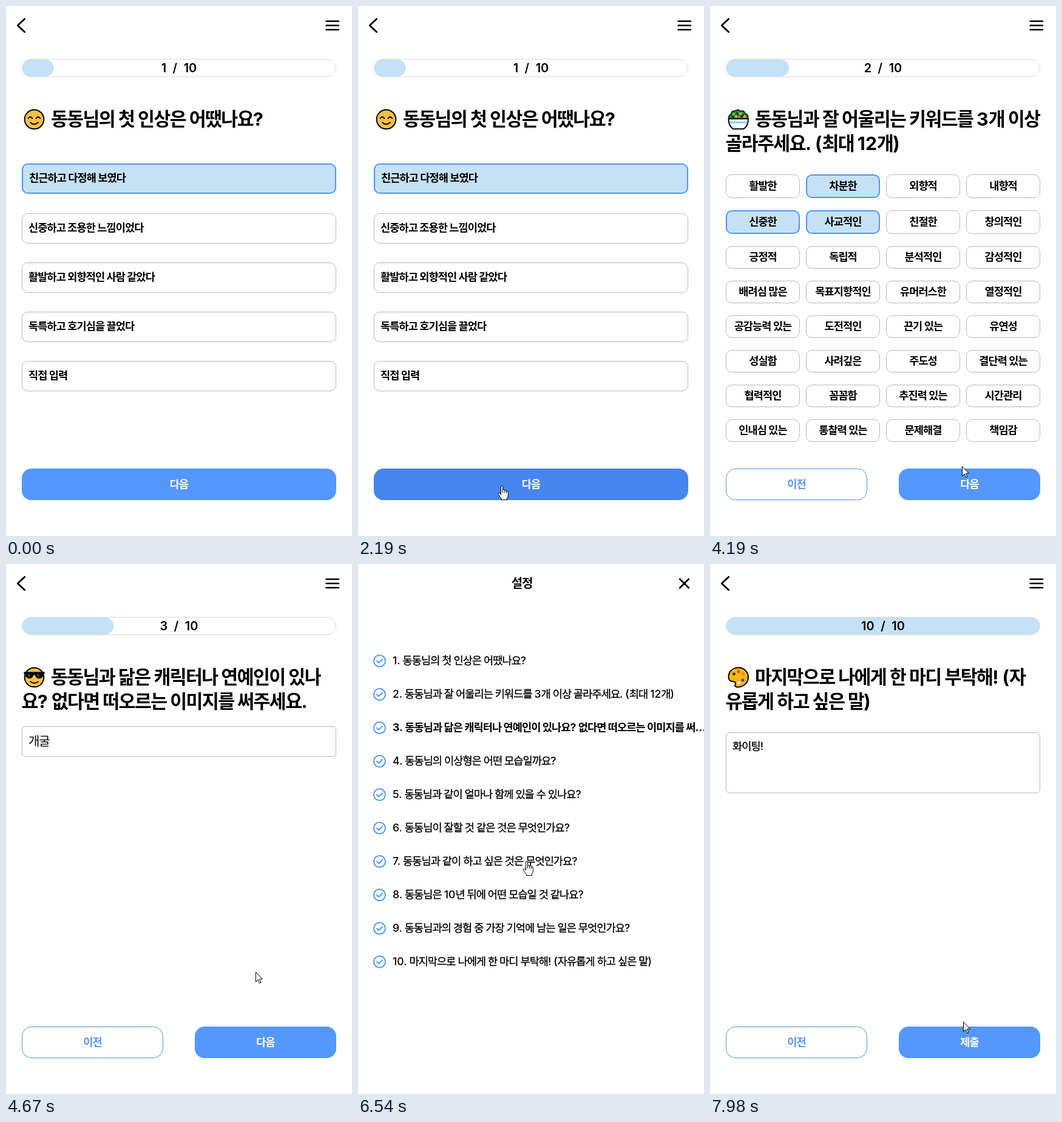
An HTML page for the animation above (8000 ms loop, 570 px wide and 872 px high).

```html
<!DOCTYPE html>
<html lang="ko">
<head>
<meta charset="utf-8">
<title>설문</title>
<style>
  html, body { margin: 0; width: 100%; height: 100%; overflow: hidden; background: #fff; }
  svg { display: block; width: 570px; height: 872px; }
  text { font-family: Inter, 'Noto Sans CJK KR', 'Noto Sans CJK', sans-serif; letter-spacing: -.055em; word-spacing: .01em; }
  text[font-weight="500"] { stroke: #000; stroke-width: .3px; }
  tspan { letter-spacing: 0; stroke: none; }
  .line { fill: none; stroke: #000; stroke-linecap: round; stroke-linejoin: round; }
</style>
</head>
<body>
<svg id="stage" viewBox="0 0 570 872"></svg>
<script>
const LOOP = 8000;
const BLUE = '#5498ff', HOVER = '#4586ee', EDGE = '#4c96f5', PALE = '#c5e1f6', GREY = '#b9b9b9';
const NAME = '동동님';

// Latin runs keep their natural spacing; Hangul is set slightly tighter.
const text = (str, x, middle, { size = 17.6, weight = 700, fill = '#000', anchor = 'start' } = {}) =>
  `<text x="${x}" y="${middle + size * .36}" font-size="${size}" font-weight="${weight}" fill="${fill}"
    text-anchor="${anchor}">${str.replace(/[\x21-\x7e\u00a0]+/g, '<tspan>$&</tspan>')}</text>`;

const box = (x, y, w, h, r, fill, stroke, sw = 1, cls = '') =>
  `<rect class="${cls}" x="${x + sw / 2}" y="${y + sw / 2}" width="${w - sw}" height="${h - sw}" rx="${r - sw / 2}"
    fill="${fill}" stroke="${stroke}" stroke-width="${sw}"/>`;

const choice = (x, y, w, h, on) =>
  on ? box(x, y, w, h, 10, PALE, EDGE, 2) : box(x, y, w, h, 10, '#fff', GREY);

const line = (d, width) => `<path class="line" d="${d}" stroke-width="${width}"/>`;
const dot = (x, y, r, fill) => `<circle cx="${x}" cy="${y}" r="${r}" fill="${fill}"/>`;

const title = (first, second = '') =>
  text(first, 74, 186.5, { size: 30.4 }) + text(second, 25.5, 226.5, { size: 30.4 });

const nextButton = (x, label) =>
  box(x, 761, 544 - x, 52, 16, BLUE, 'none', 0, 'next') +
  text(label, (x + 544) / 2, 787, { fill: '#fff', anchor: 'middle' });

const buttons = label =>
  box(26, 761, 233, 52, 16, '#fff', EDGE) +
  text('이전', 142.5, 787, { fill: '#5a97ee', anchor: 'middle' }) + nextButton(311, label);

const face = `<circle cx="46.5" cy="186.5" r="15.8" fill="#ffc043" stroke="#000" stroke-width="2"/>`;
const icons = {
  smile: face + line('M36.5 185q3.5-5 7 0M49.5 185q3.5-5 7 0M40 191.5q6.5 6 13 0', 1.8),
  cool: face + line('M40 193.5q7 5 13 0', 1.8) +
    `<path d="M29.5 177.5h34v3l-2 1q-1 7-7 7q-5 0-7-6h-2q-2 6-7 6q-6 0-7-7l-2-1z"/>
     <path d="M36 181l4 4M51 181l4 4" stroke="#777" stroke-width="1.4"/>`,
  salad: `<path d="M31 186q-1-6 4-8q0-6 6-5q5-4 9 0q6-2 8 4q6 2 4 9z" fill="#2c8a2f" stroke="#063b0d" stroke-width="2"/>` +
    line('M36 181l4 3M44 175l2 4M55 179l-4 4', 1.3) +
    dot(39, 178, 2, '#6fc04f') + dot(43, 182, 2.2, '#f2a15f') + dot(50, 177, 2.3, '#f2a15f') +
    dot(57, 182, 2.2, '#f2a15f') + dot(48, 183, 1.8, '#e77b43') +
    `<path d="M30.5 185.5h32.5q0 12-7.5 16.7h-17.5q-7.5-4.7-7.5-16.7z" fill="#fff" stroke="#000" stroke-width="2"/>
     <path d="M32 191.5h29.5" stroke="#8fd0f5" stroke-width="3"/>`,
  palette: `<path d="M47 170.5c-10 0-16.5 7-16.5 15c0 6 4 8 8 8c4 0 4 3 3 5c-1 3 2 4.5 6 4c9-1 15.5-8 15.5-16c0-9-7-16-16-16z"
      fill="#ffb60d" stroke="#000" stroke-width="2"/>` +
    dot(39.5, 181, 2.4, '#4a2a12') + dot(47, 177, 2.4, '#c9540c') + dot(55, 181, 2.4, '#e58a00') +
    dot(54, 191, 2.6, '#2455b8') + dot(47.5, 196, 2.4, '#fff'),
};

const options = ['친근하고 다정해 보였다', '신중하고 조용한 느낌이었다', '활발하고 외향적인 사람 같았다',
  '독특하고 호기심을 끌었다', '직접 입력'];
const optionY = i => Math.round(259.3 + 81.2 * i);

const chips = ['활발한', '차분한', '외향적', '내향적', '신중한', '사교적인', '친절한', '창의적인',
  '긍정적', '독립적', '분석적인', '감성적인', '배려심 많은', '목표지향적인', '유머러스한', '열정적인',
  '공감능력 있는', '도전적인', '끈기 있는', '유연성', '성실함', '사려깊은', '주도성', '결단력 있는',
  '협력적인', '꼼꼼함', '추진력 있는', '시간관리', '인내심 있는', '통찰력 있는', '문제해결', '책임감'];
const pickedChips = [1, 4, 5];
const chipBox = i => {
  const row = i >> 2;
  return [26 + 132 * (i % 4), row < 2 ? 277 + 59 * row : 281 + 57 * row, 122, row < 2 ? 39 : 37];
};

const questions = [`${NAME}의 첫 인상은 어땠나요?`, `${NAME}과 잘 어울리는 키워드를 3개 이상 골라주세요. (최대 12개)`,
  `${NAME}과 닮은 캐릭터나 연예인이 있나요? 없다면 떠오르는 이미지를 써...`, `${NAME}의 이상형은 어떤 모습일까요?`,
  `${NAME}과 같이 얼마나 함께 있을 수 있나요?`, `${NAME}이 잘할 것 같은 것은 무엇인가요?`,
  `${NAME}과 같이 하고 싶은 것은 무엇인가요?`, `${NAME}은 10년 뒤에 어떤 모습일 것 같나요?`,
  `${NAME}과의 경험 중 가장 기억에 남는 일은 무엇인가요?`, '마지막으로 나에게 한 마디 부탁해! (자유롭게 하고 싶은 말)'];

const pages = {
  first: icons.smile + title(`${NAME}의 첫 인상은 어땠나요?`) +
    options.map((label, i) => choice(26, optionY(i), 518, 50, i === 0) +
      text(label, i ? 37 : 38, optionY(i) + 24)).join('') + nextButton(26, '다음'),
  keywords: icons.salad + title(`${NAME}과 잘 어울리는 키워드를 3개 이상`, '골라주세요. (최대 12개)') +
    chips.map((label, i) => {
      const [x, y, w, h] = chipBox(i);
      return choice(x, y, w, h, pickedChips.includes(i)) + text(label, x + w / 2, y + h / 2 - .5, { anchor: 'middle' });
    }).join('') + buttons('다음'),
  lookalike: icons.cool + title(`${NAME}과 닮은 캐릭터나 연예인이 있나`, '요? 없다면 떠오르는 이미지를 써주세요.') +
    box(26, 267, 518, 50, 6, '#fff', GREY) + text('개굴', 37, 292, { size: 20, weight: 400 }) + buttons('다음'),
  menu: text('설정', 270, 32, { size: 20, anchor: 'middle' }) + line('M530.2 24.7l14.6 14.6m0-14.6l-14.6 14.6', 2.8) +
    questions.map((q, i) => {
      const y = 159 + 55 * i;
      return `<g fill="none" stroke="#519cf8" stroke-width="2"><circle cx="35.5" cy="${y + .5}" r="9.5"/>
        <path d="M31 ${y + .5}l3.2 3.2l6-6" stroke-linecap="round" stroke-linejoin="round"/></g>` +
        text(`${i + 1}. ${q}`, 57, y, { weight: i === 2 ? 700 : 500 });
    }).join(''),
  last: icons.palette + title('마지막으로 나에게 한 마디 부탁해! (자', '유롭게 하고 싶은 말)') +
    box(26, 277, 518, 100, 6, '#fff', GREY) + text('화이팅!', 37, 300, { weight: 500 }) + buttons('제출'),
};

const scenes = [
  { at: 0, page: 'first', step: 1, from: 1 },
  { at: 2390, page: 'keywords', step: 2, from: 1 },
  { at: 4400, page: 'lookalike', step: 3, from: 2 },
  { at: 5840, page: 'menu' },
  { at: 7220, page: 'last', step: 10, from: 3 },
];

// Pointer path: time, x, y
const path = [
  [530, 228, 798], [900, 236, 772], [1160, 238, 735], [1300, 240, 662], [1440, 243, 569], [1580, 247, 508],
  [1700, 247, 515], [1900, 243, 680], [2120, 240, 788], [2190, 237, 789], [2390, 237, 789],
  [2680, 267, 411], [2820, 267, 411], [3170, 345, 342], [3440, 345, 342], [3860, 405, 800], [3990, 408, 806],
  [4190, 415, 757], [4320, 418, 785], [4480, 418, 785], [4800, 405, 560], [5020, 397, 422], [5160, 480, 300],
  [5300, 580, 195], [5500, 576, 95], [5560, 566, 81], [5700, 540, 35], [5900, 538, 34], [6330, 436, 168],
  [6540, 278.5, 488], [6750, 256, 560], [7090, 236, 657], [7290, 236, 657], [7700, 375, 735], [7980, 417, 753],
];

const stage = document.getElementById('stage');
stage.innerHTML =
  `<rect width="570" height="872" fill="#fff"/>
  <g id="header">${line('M30.7 21.2L19.2 32L30.7 42.8', 2.8)}${line('M527.5 25h20.5m-20.5 7h20.5m-20.5 7h20.5', 2.5)}
    ${box(26, 87, 518, 30, 15, '#fff', '#dcdcdc')}
    <rect id="bar" x="27" y="88" height="28" rx="14" fill="${PALE}"/><g id="count"></g></g>
  ${Object.entries(pages).map(([id, body]) => `<g id="${id}">${body}</g>`).join('')}
  <g id="pointer" fill="#fff" stroke="#000" stroke-linejoin="round">
    <path id="arrow" d="M.5.5V16.5L4.2 13L6.7 18.7L9 17.7L6.5 12H11.5Z"/>
    <path id="hand" d="M-1.5 13V1.8a1.5 1.5 0 0 1 3 0V8a1.5 1.5 0 0 1 3.2 0v1a1.5 1.5 0 0 1 3 .2v1a1.3 1.3 0 0 1 2.6.2
      V16q0 3-2 5v2.5H-.5V21.5Q-3.5 19-5.8 14.5q-.5-2.5 1.5-2.5q1.5.5 2.8 3zM1.5 8v4M4.7 9v3M7.7 10v2.5"/>
  </g>`;
const $ = id => document.getElementById(id);
const show = (id, on) => $(id).setAttribute('visibility', on ? 'visible' : 'hidden');

const slope = (i, axis) => {
  const [a, b, c] = [path[i - 1], path[i], path[i + 1]];
  if (!a || !c) return 0;
  const before = b[axis] - a[axis], after = c[axis] - b[axis];
  return before * after <= 0 ? 0 : (before + after) / (c[0] - a[0]);
};

const pointerAt = t => {
  const i = path.findIndex((p, k) => k === path.length - 1 || t < path[k + 1][0]);
  if (i === path.length - 1) return path[i].slice(1);
  const a = path[i], b = path[i + 1], span = b[0] - a[0], u = (t - a[0]) / span;
  return [1, 2].map(axis =>
    a[axis] + (b[axis] - a[axis]) * u * u * (3 - 2 * u) +
    span * u * (1 - u) * (slope(i, axis) * (1 - u) - slope(i + 1, axis) * u));
};

const inside = (x, y, [left, top, w, h]) => x >= left && x <= left + w && y >= top && y <= top + h;
const nextArea = page => page === 'first' ? [26, 761, 518, 52] : [311, 761, 233, 52];
const targets = {
  first: options.map((_, i) => [26, optionY(i), 518, 50]),
  keywords: chips.map((_, i) => chipBox(i)),
  menu: questions.map((_, i) => [25, 147 + 55 * i, 520, 24]),
};

// CSS "ease" timing
const ease = p => {
  if (p <= 0 || p >= 1) return p <= 0 ? 0 : 1;
  const bez = (u, a, b) => 3 * u * (1 - u) ** 2 * a + 3 * u * u * (1 - u) * b + u ** 3;
  let lo = 0, hi = 1;
  for (let k = 0; k < 16; k++) {
    const mid = (lo + hi) / 2;
    if (bez(mid, .25, .25) < p) lo = mid; else hi = mid;
  }
  return bez(lo, .1, 1);
};

let current = null;
const enter = scene => {
  current = scene;
  Object.keys(pages).forEach(id => show(id, id === scene.page));
  show('header', scene.step);
  if (scene.step) {
    $('count').innerHTML = text(`${scene.step}\u00a0\u00a0/\u00a0\u00a010`, 285, 102, { size: 20, weight: 600, anchor: 'middle' });
  }
};

function draw(t) {
  const scene = scenes.filter(s => s.at <= t).pop();
  if (scene !== current) enter(scene);
  const { page, step, from, at } = scene;
  if (step) $('bar').setAttribute('width', 51.6 * (from + (step - from) * ease((t - at) / 420)));

  const visible = t >= path[0][0];
  const [x, y] = pointerAt(t);
  const onNext = visible && page !== 'menu' && inside(x, y, nextArea(page));
  const onTarget = onNext || (targets[page] || []).some(area => inside(x, y, area)) || inside(x, y, [525, 20, 26, 26]);
  const button = $(page).querySelector('.next');
  if (button) button.setAttribute('fill', onNext ? HOVER : BLUE);
  $('pointer').setAttribute('transform', `translate(${Math.round(x)} ${Math.round(y)})`);
  show('arrow', visible && !onTarget);
  show('hand', visible && onTarget);
}

const start = performance.now();
function tick() {
  draw((performance.now() - start) % LOOP);
  requestAnimationFrame(tick);
}
tick();
</script>
</body>
</html>
```
